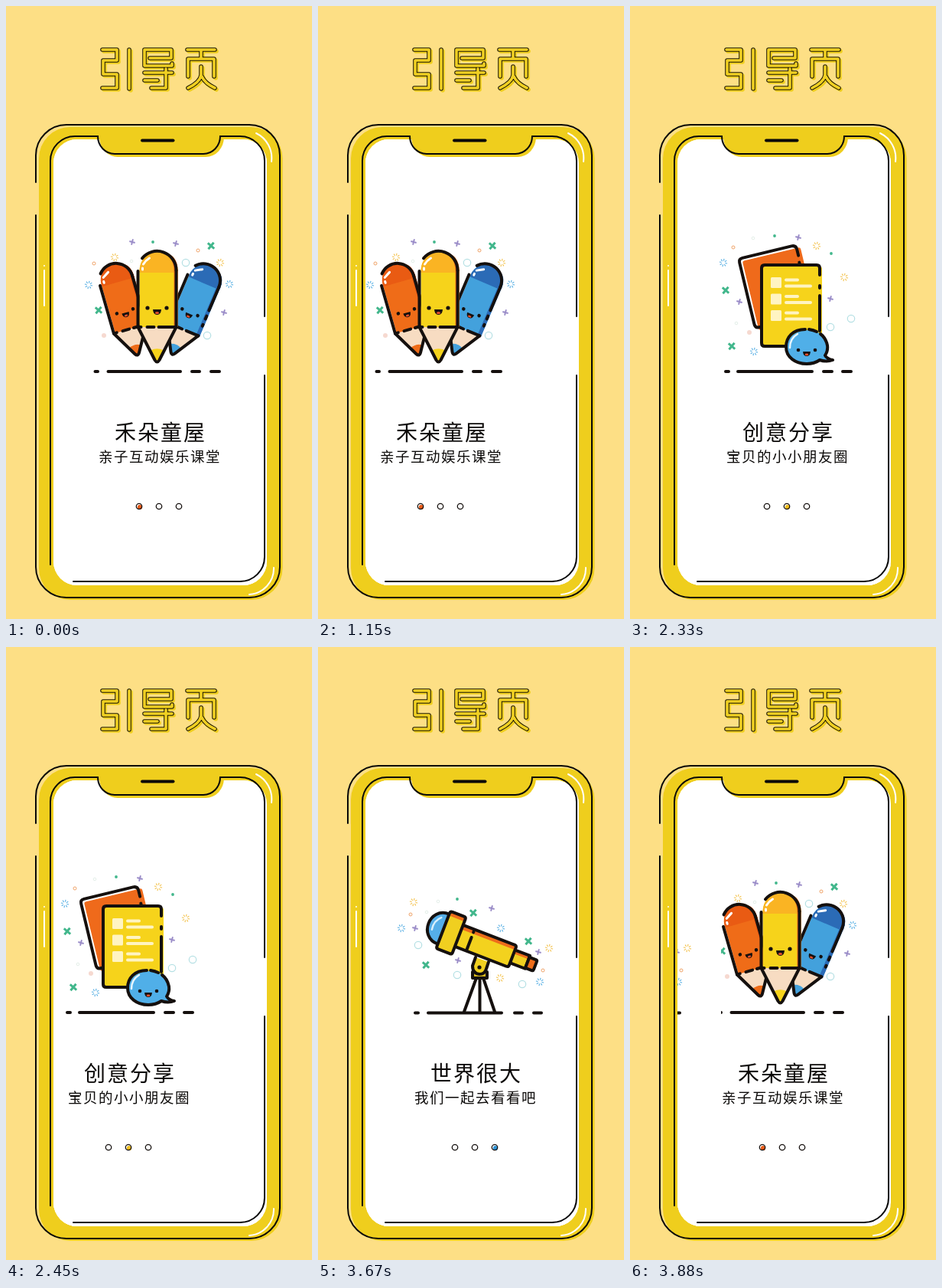
Recreate the animation shown at these times as an HTML page. Size 400x800 px, loop 3910 ms.

```html
<!DOCTYPE html>
<html lang="zh-CN">
<head>
<meta charset="utf-8">
<title>引导页</title>
<style>
  html, body { margin: 0; width: 100%; height: 100%; overflow: hidden; background: #fddf85; }
  svg { display: block; width: 400px; height: 800px; }
  text { font-family: "Noto Sans CJK SC", "Noto Sans CJK", "Noto Sans", sans-serif; font-weight: 400; fill: #0c0a09; }
  .head { font-size: 28px; letter-spacing: 2px; }
  .sub { font-size: 18.5px; letter-spacing: 1.5px; }
  .line { fill: none; stroke: #15100e; stroke-width: 4; stroke-linecap: round; stroke-linejoin: round; }
  .case { fill: none; stroke: #080808; stroke-width: 2; stroke-linecap: round; }
  .shine { fill: none; stroke: #fff; stroke-width: 2; stroke-linecap: round; }
  .title { fill: none; stroke-linecap: round; stroke-linejoin: round; }
</style>
</head>
<body>
<svg viewBox="0 0 400 800">
  <defs>
    <clipPath id="screen"><rect x="62" y="174" width="279" height="582" rx="31"/></clipPath>
    <path id="glyphs" d="M126 57H145V71H127V89H145V107H126 M161 57V108
      M181 57H216V68H188 M181 57V78H217V75 M181 87H217 M209 82V107H190 M181 97H198
      M237 57H273 M255 57V68 M238 92V69H272V92 M255 79V90Q254 99 238 107 M256 92Q260 101 273 107"/>
  </defs>

  <g class="title">
    <use href="#glyphs" x="2" y="2" stroke="#efce1d" stroke-width="5.6"/>
    <use href="#glyphs" stroke="#1a1405" stroke-width="5.6"/>
    <use href="#glyphs" stroke="#f0d022" stroke-width="3.6"/>
  </g>

  <rect x="43" y="158" width="318.5" height="617" rx="41" fill="#efce1d"/>
  <rect x="62" y="174" width="279" height="582" rx="31" fill="#fff"/>
  <g clip-path="url(#screen)"><g id="stack"></g></g>

  <path d="M122 171H285A24 26 0 0 1 261 197H147A24 26 0 0 1 122 171Z" fill="#efce1d"/>
  <path class="case" d="M39 230V195A40 40 0 0 1 79 155H318A40 40 0 0 1 358 195V732A40 40 0 0 1 318 772H79A40 40 0 0 1 39 732V273"/>
  <path class="case" d="M58 729V202A32 32 0 0 1 90 170H120A22 23 0 0 0 142 193H258A22 23 0 0 0 280 170H306A32 32 0 0 1 338 202V405 M338 482V719A32 32 0 0 1 306 751H88"/>
  <path class="case" d="M178 175.500H218.500" style="stroke-width:4"/>
  <path class="shine" d="M327 166A36 36 0 0 1 347 203 M318 768A34 34 0 0 0 350 733 M50 345V391 M50 339V339.100"/>
</svg>

<script>
const INK = '#15100e';
const path = (d, fill) => `<path d="${d}" fill="${fill}"/>`;
const line = d => `<path class="line" d="${d}"/>`;
const rect = (x, y, w, h, fill, r = 0) => `<rect x="${x}" y="${y}" width="${w}" height="${h}" rx="${r}" fill="${fill}"/>`;
const disc = (x, y, r, fill) => `<circle cx="${x}" cy="${y}" r="${r}" fill="${fill}"/>`;
const ring = (x, y, r, color, w = 1) => `<circle cx="${x}" cy="${y}" r="${r}" fill="none" stroke="${color}" stroke-width="${w}"/>`;
const stroke = (d, color, w, cap = 'butt') => `<path d="${d}" fill="none" stroke="${color}" stroke-width="${w}" stroke-linecap="${cap}"/>`;
const place = (x, y, turn, body) => `<g transform="translate(${x} ${y}) rotate(${turn})">${body}</g>`;

// Confetti
function burst(x, y, color) {
  let d = '';
  for (let i = 0; i < 8; i++) {
    const c = Math.cos(i * Math.PI / 4 + .2), s = Math.sin(i * Math.PI / 4 + .2);
    d += `M${x + 2.4 * c} ${y + 2.4 * s}L${x + 5.2 * c} ${y + 5.2 * s}`;
  }
  return stroke(d, color, 1.1);
}
const plus = (x, y, size, color, w, turn) => place(x, y, turn, stroke(`M${-size} 0H${size}M0 ${-size}V${size}`, color, w));
const bits = {
  sun: (x, y) => burst(x, y, '#f3c14b'),
  spark: (x, y) => burst(x, y, '#55aee3'),
  cross: (x, y) => plus(x, y, 5.5, '#42b78c', 3, 40),
  plus: (x, y) => plus(x, y, 3.8, '#9a8cc8', 1.9, 15),
  dot: (x, y) => disc(x, y, 1.9, '#42b78c'),
  pink: (x, y) => disc(x, y, 3, '#f6d9d0'),
  small: (x, y) => ring(x, y, 2, '#f0a46a'),
  pale: (x, y) => ring(x, y, 1.8, '#e4efe9'),
  bubble: (x, y) => ring(x, y, 4.7, '#b5e0e4', 1.2)
};
const scatter = table => Object.entries(table).map(([kind, spots]) =>
  spots.split(' ').map(s => bits[kind](...s.split(',').map(Number))).join('')).join('');

const face = (x, y, gap, k = 1) => disc(x - gap, y, 2.6 * k, INK) + disc(x + gap, y, 2.6 * k, INK) +
  path(`M${x - 5.5 * k} ${y + 2}H${x + 5.5 * k}Q${x + 5 * k} ${y + 9 * k} ${x} ${y + 9 * k}Q${x - 5 * k} ${y + 9 * k} ${x - 5.5 * k} ${y + 2}Z`, INK) +
  `<ellipse cx="${x}" cy="${y + 6.6 * k}" rx="${2.6 * k}" ry="${1.5 * k}" fill="#e8502f"/>`;

// Pencil with its point at the local zero, standing upward
function pencil(x, y, turn, p) {
  const { w, base, top, main, cap, shade, breaks = '' } = p;
  const round = top + w, tip = .34;
  const dome = `M${-w} ${round}A${w} ${w} 0 0 1 ${w} ${round}`;
  return place(x, y, turn,
    path(`M${-w} ${base}L0 0L${w} ${base}Z`, '#f7dcc2') +
    path(`M${-w * tip} ${base * tip}Q0 ${base * tip - 4} ${w * tip} ${base * tip}L0 0Z`, main) +
    '<g transform="translate(2 0)">' +
    path(`${dome}V${base}H${-w}Z`, main) +
    path(`${dome}V${round + 3}H${-w}Z`, cap) +
    path(`M${w - 5} ${base}V${round}Q${w - 6} ${top + 8} ${w * .3} ${top + 2}Q${w} ${top + 5} ${w} ${round}V${base}Z`, shade) +
    '</g>' +
    stroke(`M${-w + 6} ${round - 1}V${round - 3}M${-w + 7} ${round - 8}Q${-w + 10} ${top + 12} ${-w + 15} ${top + 9}`, '#fff', 3, 'round') +
    line(`M${-w} ${round + 1}V${base}L-3 -3Q0 2 3 -3L${w} ${base}${breaks}V${round}`) +
    line(`M${-w * .78} ${round - w * .63}A${w} ${w} 0 0 1 ${w} ${round}`) +
    line(`M${-w} ${base}H${-w + 4}M${-w + 12} ${base}H${-w + 21}M${-w + 27} ${base}H${w}`) +
    face(0, p.eyes, w * .5, w / 25));
}

const pencils = () =>
  pencil(172, 456, -16, { w: 22, base: -36, top: -124, eyes: -60, main: '#ef6c18', cap: '#e95b13', shade: '#e45712' }) +
  pencil(217, 455, 23, { w: 22, base: -36, top: -127, eyes: -60, main: '#43a1dc', cap: '#2b6bb6', shade: '#2b6bb6',
    breaks: 'M22 -50V-52M22 -60V-64M22 -72' }) +
  pencil(197.5, 465, 0, { w: 25, base: -46, top: -145, eyes: -71, main: '#f6d31b', cap: '#fab423', shade: '#ee6d1b' });

function sheets() {
  let rows = '';
  for (let i = 0; i < 3; i++) {
    const y = 354 + 21.5 * i;
    rows += rect(179, y, 14, 14, '#fff4c2', 1.5) + rect(197, y + 1.5, 19, 4, '#fff4c2', 2) + rect(197, y + 9.5, 36, 4, '#fff4c2', 2);
  }
  return place(137, 330, -13.5, rect(4, 4, 78, 93, '#ef6a1b', 3) +
      line('M77 14V6Q77 0 71 0H5Q0 0 0 5V88Q0 93 5 93H40') + line('M76 23V32')) +
    rect(169, 340, 77, 104, '#f6d31b', 3) + rows +
    line('M243 351V342Q243 338 239 338H171Q167 338 167 342V440Q167 444 171 444H202 M243 365V368 M243 378V424') +
    path('M226 423C242 423 254 432 254 446Q253 453 249 457Q253 462 260 462Q250 467 242 463C234 469 218 469 208 462C197 453 198 437 208 429Q216 423 226 423Z', '#50afe8') +
    stroke('M204 446Q204 434 214 428', '#e8f6fd', 2.5, 'round') +
    line('M224 422C208 422 199 432 199 445C199 458 211 467 226 467Q236 467 243 462Q252 465 260 462Q253 461 250 456Q254 450 253 443Q251 433 244 428') +
    line('M229 422Q235 423 239 425') + face(226, 449, 11, .9);
}

function telescope() {
  const scope =
    path('M-11 -22A21 21 0 0 0 -11 21Z', '#55aee8') +
    stroke('M-25 5Q-27 -7 -19 -14', '#d9f0fb', 2.5, 'round') +
    line('M-11 -22C-39 -22 -39 20 -11 20') +
    rect(85, -9, 22, 18, '#f0cf20') + rect(85, -9, 22, 5, '#ee6d1b') + line('M85 -9H107V9H85Z') +
    rect(107, -7, 11, 15, '#ee6d1b', 2) + line('M107 -7H116Q118 -7 118 -5V6Q118 8 116 8H107Z') +
    rect(11, -15, 75, 30, '#f3d21e') + rect(11, -15, 75, 6, '#ee6d1b') +
    line('M11 -15H83Q86 -15 86 -12V12Q86 15 83 15H11') +
    line('M27 -12V-11 M27 -4V14') +
    rect(-11, -26, 22, 52, '#f0cf20', 3) + rect(-9, -25, 19, 5, '#ee6d1b') +
    line('M-8 -26H8Q11 -26 11 -23V23Q11 26 8 26H-8Q-11 26 -11 23V-23Q-11 -26 -8 -26Z');
  return line('M202 432L186 476 M206.500 432V476 M211 432L226 476') +
    rect(197, 423, 19, 9, '#d9b91c') + line('M197 424V432H216V424') +
    path('M201 405L218 411L215 421Q208 430 200 424Q196 419 198 413Z', '#f0cf20') +
    line('M201 405L197 416Q197 426 206 427Q213 427 215 420L218 411') + disc(206, 418, 2.6, INK) +
    place(169, 373, 21, scope);
}

const pages = [
  {
    head: '禾朵童屋', sub: '亲子互动娱乐课堂', color: '#e85a17', art: pencils,
    ground: 'M116.500 477H120M133.500 477H228M243 477H253M268 477H279',
    bits: { sun: '142,328 280,335', spark: '108,364 292,363', cross: '121,397 268,313', plus: '165,308 222,310 285,400',
      dot: '192,308', pink: '128,430', small: '115,336 251,319', pale: '164,333', bubble: '235,335 263,430' }
  },
  {
    head: '创意分享', sub: '宝贝的小小朋友圈', color: '#f2bd1b', art: sheets,
    ground: 'M120 477H124M136 477H233M248 477H259M273 477H284',
    bits: { sun: '239,313 275,354', spark: '117,335 157,451', cross: '120,371 128,444', plus: '215,302 138,386 257,382',
      dot: '184,300 258,323', pink: '151,426', small: '130,315', pale: '156,303 134,414', bubble: '257,419 284,408' }
  },
  {
    head: '世界很大', sub: '我们一起去看看吧', color: '#2f93d6', art: telescope,
    ground: 'M122 477.500H126M139 477.500H235M252 477.500H262M277 477.500H287',
    bits: { sun: '120,333 233,432 297,393', spark: '104,367 234,367 285,437', cross: '198,347 270,384 136,415',
      plus: '222,341 122,367 178,409 283,398', dot: '177,329', small: '116,349 289,422', pale: '152,332 137,346',
      bubble: '126,389 177,428 262,440' }
  }
];

const stack = document.getElementById('stack');
stack.innerHTML = pages.map((p, i) => '<g>' + rect(62, 170, 279, 590, '#fff') +
  scatter(p.bits) + line(p.ground) + p.art() +
  `<text class="head" x="142" y="567">${p.head}</text><text class="sub" x="121" y="595">${p.sub}</text>` +
  disc(175 + 26 * i, 654, 3.1, p.color) +
  [174, 200, 226].map(x => ring(x, 653, 3.7, INK, 1.3)).join('') + '</g>').join('');
const layers = [...stack.children];

// Each turn: wind up to the right, then sweep left over the next page
const LOOP = 3910, STEP = 30, TURNS = [1030, 2330, 3670];
const ease = u => u * u * (3 - 2 * u);
const leave = n => n <= 3 ? 20 * ease(n / 3) : 20 - 302 * ease((n - 3) / 7);
const arrive = n => -10 * (1 - ease(n / 10));

function show(t) {
  const turn = TURNS.findLastIndex(start => t >= start);
  const n = turn < 0 ? 10 : Math.min(10, Math.floor((t - TURNS[turn]) / STEP) + 1);
  const next = (turn + 1) % 3, old = n < 10 ? turn : -1;
  layers.forEach((g, i) => {
    g.style.display = i === next || i === old ? '' : 'none';
    const x = i === old ? leave(n) : arrive(n);
    g.setAttribute('transform', `translate(${Math.round(x)} 0)`);
  });
  if (old >= 0 && stack.lastChild !== layers[old]) stack.append(layers[old]);
}

const begin = performance.now();
function tick() {
  show((performance.now() - begin) % LOOP);
  requestAnimationFrame(tick);
}
tick();
</script>
</body>
</html>
```
